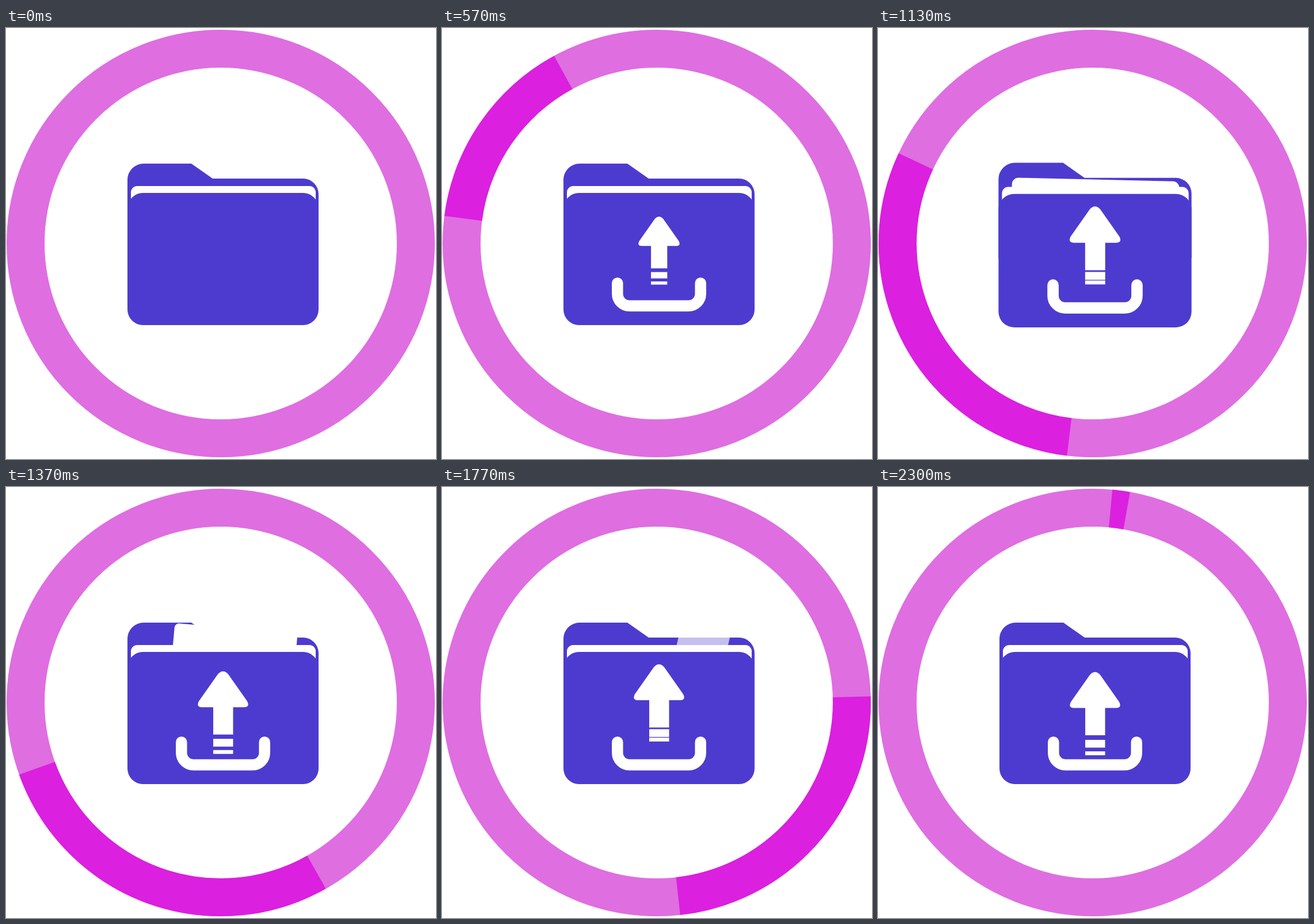
Recreate the animation shown at these times as an HTML page. Size 747 by 750 pixels, loop 2.33 s.

```html
<!DOCTYPE html>
<html lang="en">
<head>
<meta charset="utf-8">
<title>Folder upload</title>
<style>
  html, body { margin: 0; width: 100%; height: 100%; overflow: hidden; background: #fff; }
  svg { display: block; width: 747px; height: 750px; }
  .blue { fill: #4d3bcf; }
  .white { fill: #fff; }
  .line { fill: none; stroke: #fff; stroke-width: 19.5; stroke-linecap: round; }
  .ring { fill: none; stroke: #df6ee1; stroke-width: 66; }
  #arc { stroke: #db20df; }
</style>
</head>
<body>
<svg viewBox="0 0 747 750">
  <circle class="ring" cx="373" cy="375" r="339"/>
  <path class="ring" id="arc" pathLength="360" d="M373 36a339 339 0 0 0 0 678a339 339 0 0 0 0-678"/>
  <g id="folder">
    <path class="blue" d="M211 264a28 28 0 0 1 28-28H322L359 262H516a27 27 0 0 1 27 27V400H211Z"/>
    <rect class="white" id="paper" x="-144" y="-100" width="288" height="200" rx="11"/>
    <g id="front">
      <path class="white" d="M217 320V286a11 11 0 0 1 11-11H527a11 11 0 0 1 11 11V320Z"/>
      <rect class="blue" x="211" y="287" width="332" height="230" rx="27"/>
      <path class="line" id="tray" d="M-72.2-19.5V-1a21 21 0 0 0 21 21H51.2a21 21 0 0 0 21-21V-19.5"/>
      <g id="arrow" class="white">
        <path id="head" d="M368 327Q377 317 386 327L419 374Q424 384 414 384.5H394.5V432H360V384.5H340Q330 384 335 374Z"/>
        <rect id="bar" x="360" y="440" width="34.5" height="13.5"/>
        <rect id="foot" x="360" y="460" width="34.5" height="6.7"/>
      </g>
    </g>
  </g>
</svg>
<script>
const LOOP = 2330;
const FPS = 0.03; // steps per millisecond
const set = (id, name, value) => document.getElementById(id).setAttribute(name, value);
const move = (id, value) => set(id, 'transform', value);
const after = (t, start) => Math.max(0, t - start);
const span = (t, a, b) => Math.min(1, after(t, a) / (b - a));
const smooth = x => x * x * (3 - 2 * x);
const bump = x => Math.sin(Math.PI * x) ** 2;

// Both ends run anticlockwise from the top; the tail speeds up to catch the head
function drawRing(t) {
  const head = 0.1457 * t + 0.022 * after(t, 770) - 0.012 * after(t, 1130);
  const tail = 0.0505 * t + 0.141 * after(t, 1078) + 0.123 * after(t, 1800);
  set('arc', 'stroke-dasharray', `${Math.max(0, head - tail)} 400`);
  set('arc', 'stroke-dashoffset', -tail);
}

function drawFolder(t) {
  const push = bump(span(t, 1030, 1236));
  move('folder', `translate(377 376.5) scale(${1 + 0.01 * push}) translate(-377 -376.5)`);
  move('front', `translate(0 ${2.5 * push})`);
}

// The sheet peeks out, then flies up to the right, shrinking and fading
function drawPaper(t) {
  const peek = span(t, 1030, 1133);
  const fly = after(t, 1133) / 634;
  const x = 376 + 78 * fly ** 1.5;
  const y = 380 - 15 * peek - 97 * fly ** 0.77;
  const turn = 1.3 * peek + 11.7 * fly ** 1.15;
  move('paper', `translate(${x} ${y}) rotate(${turn}) scale(${Math.max(0, 1 - 0.698 * fly)})`);
  set('paper', 'opacity', peek ? 1 - span(t, 1640, 2030) : 0);
}

function drawIcon(t) {
  const drop = smooth(span(t, 280, 562));
  move('tray', `translate(377 ${314 + 149.5 * drop}) scale(${span(t, 170, 488)})`);
  set('tray', 'visibility', t < 170 ? 'hidden' : 'visible');

  const grow = span(t, 327, 620);
  move('arrow', `translate(377 ${314 + 80.5 * smooth(grow)}) scale(${grow}) translate(-377 -394.5)`);
  const lift = bump(2 * span(t, 790, 2070));
  move('head', `translate(0 ${-13.5 * lift})`);
  move('bar', `translate(0 ${-18.7 * lift})`);
  move('foot', `translate(0 ${-24 * lift})`);
}

const start = performance.now();
function frame() {
  const now = (performance.now() - start) % LOOP;
  const t = Math.floor(now * FPS + 0.15) / FPS % LOOP;
  drawRing(t);
  drawFolder(t);
  drawPaper(t);
  drawIcon(t);
  requestAnimationFrame(frame);
}
frame();
</script>
</body>
</html>
```
